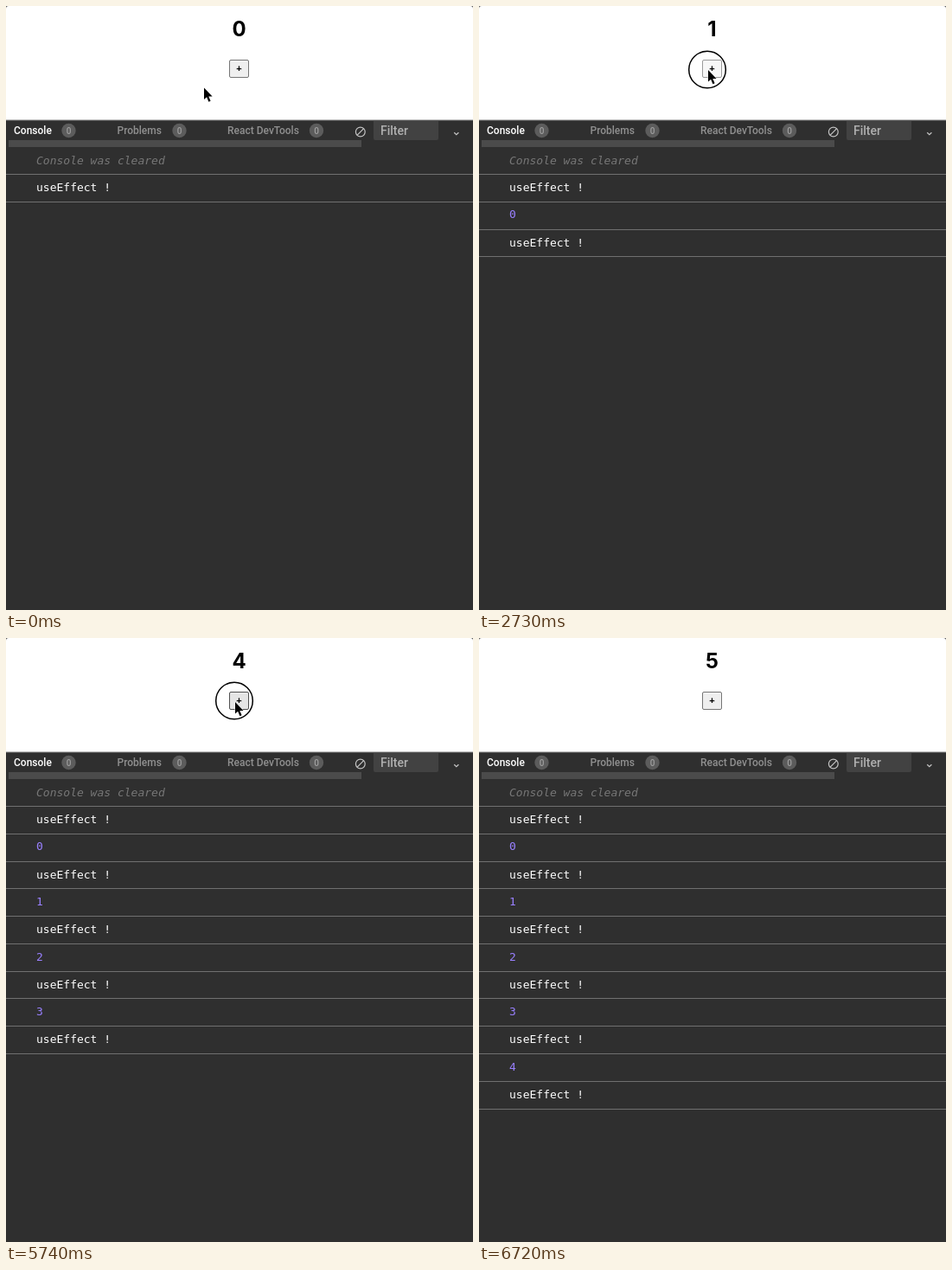
Write an HTML page that moves like this. It is 540x698 px and loops after 6.79 s.

```html
<!DOCTYPE html>
<html lang="en">
<head>
<meta charset="utf-8">
<title>useEffect counter</title>
<style>
  html, body { margin: 0; width: 100%; height: 100%; overflow: hidden; background: #fff; }
  svg { display: block; width: 100%; height: 100%; }
  text { white-space: pre; }
  .ui { font: 500 12px Roboto, sans-serif; }
  .mono { font: 13px "DejaVu Sans Mono", monospace; }
</style>
</head>
<body>
<svg viewBox="0 0 540 698">
  <rect width="540" height="698" fill="#fff"/>
  <path d="M0 0H3Q0 0 0 3ZM540 0H537Q540 0 540 3Z" fill="#555"/>
  <text id="count" x="269.5" y="34.5" text-anchor="middle" font-family="Inter, sans-serif" font-size="24" font-weight="700"></text>
  <rect id="button" x="258.5" y="62.5" width="22" height="20" rx="1.5"/>
  <text x="269.5" y="76.3" text-anchor="middle" font-family="Liberation Sans, sans-serif" font-size="11" font-weight="700">+</text>

  <rect y="132" width="540" height="566" fill="#2f2f2f"/>
  <rect y="131.5" width="540" height="1" fill="#777"/>
  <g id="tabs" class="ui"></g>
  <g fill="none" stroke="#c4c4c4" stroke-width="1.2">
    <circle cx="409.8" cy="145.5" r="5.4"/>
    <path d="M406 149.3L413.6 141.7M518.2 146.2L520.8 148.7L523.4 146.2"/>
  </g>
  <path d="M425 133H500V153Q500 155 498 155H427Q425 155 425 153Z" fill="#424242"/>
  <text class="ui" x="433" y="149" fill="#b0b0b0" style="font-size:14px">Filter</text>
  <rect x="3" y="155" width="408" height="8" fill="#4b4b4b"/>
  <text class="mono" x="35" y="183" fill="#777" font-style="italic" style="font-style:italic">Console was cleared</text>
  <rect y="194" width="540" height="1" fill="#707070"/>
  <g id="log" class="mono"></g>

  <circle id="ring" cx="264" r="21.3" fill="none" stroke="#000" stroke-width="1.5"/>
  <path id="cursor" d="M0 0V13.6L3.1 10.8L5.4 16.2L7.6 15.2L5.3 9.9H9.6Z" fill="#000" stroke="#fff" stroke-width="1" paint-order="stroke"/>
</svg>
<script>
const LOOP = 6790, STEP = 70;
const ROW_TOP = 194.5, ROW_H = 31.78;
const $ = id => document.getElementById(id);

// ring shown from on to off, button held from down to commit
const clicks = [
  { on: 1540, down: 1540, commit: 1680, off: 1680, y: 73.5 },
  { on: 2730, down: 2730, commit: 2800, off: 2870, y: 73.5 },
  { on: 3780, down: 3850, commit: 3920, off: 3920, y: 72.5 },
  { on: 4830, down: 4830, commit: 4970, off: 4970, y: 72.5 },
  { on: 5740, down: 5810, commit: 5880, off: 5880, y: 72.5 }
];

const buttonLook = {
  idle: ['#efefef', '#767676'],
  hover: ['#e5e5e5', '#505050'],
  down: ['#f7f7f7', '#9a9a9a']
};

function add(parent, tag, attrs, text = '') {
  const node = document.createElementNS('http://www.w3.org/2000/svg', tag);
  for (const key in attrs) node.setAttribute(key, attrs[key]);
  node.textContent = text;
  parent.append(node);
  return node;
}

function set(node, attrs) {
  for (const key in attrs) node.setAttribute(key, attrs[key]);
}

function addTab(label, x, badgeX, color) {
  add($('tabs'), 'text', { x, y: 148.3, fill: color }, label);
  add($('tabs'), 'circle', { cx: badgeX, cy: 144, r: 8.2, fill: '#5c5c5c' });
  add($('tabs'), 'text', {
    x: badgeX, y: 147.7, fill: '#a0a0a0', 'text-anchor': 'middle', style: 'font-size:10px'
  }, '0');
}

addTab('Console', 9, 72.5, '#fff');
addTab('Problems', 128.5, 200.5, '#909090');
addTab('React DevTools', 256, 359, '#909090');

const rows = Array.from({ length: 11 }, (_, i) => {
  const row = add($('log'), 'g', {});
  const top = ROW_TOP + ROW_H * i;
  const isNumber = i % 2 === 1;
  add(row, 'text', {
    x: 35, y: top + (isNumber ? 19.2 : 19.7), fill: isNumber ? '#9980ff' : '#fff'
  }, isNumber ? (i - 1) / 2 : 'useEffect !');
  add(row, 'rect', { y: Math.floor(top + ROW_H), width: 540, height: 1, fill: '#707070' });
  return row;
});

const mix = (a, b, p) => a + (b - a) * p;

function cursorAt(t) {
  if (t < 6020) {
    const p = Math.min(1, Math.max(0, (t - 210) / 420));
    const e = p * p * (3 - 2 * p);
    return [mix(229, 265, e), mix(94.5, 74, e)];
  }
  if (t < 6160) {
    const p = (t - 5950) / 140;
    return [mix(265, 225, p), mix(74, 486, p * p)];
  }
  if (t >= 6440 && t < 6720) {
    const p = (t - 6440) / 210;
    return [mix(162, 292, p), 688 - 41 * Math.sin(Math.PI * (0.1 + 0.8 * p))];
  }
  return null;
}

function draw(t) {
  const count = clicks.filter(c => t >= c.commit).length;
  $('count').textContent = count;
  rows.forEach((row, i) => set(row, { display: i <= count * 2 ? 'inline' : 'none' }));

  const shown = clicks.find(c => t >= c.on && t < c.off);
  set($('ring'), { display: shown ? 'inline' : 'none', cy: shown ? shown.y : 0 });

  const pos = cursorAt(t);
  set($('cursor'), { display: pos ? 'inline' : 'none' });
  if (pos) set($('cursor'), { transform: `translate(${pos[0]} ${pos[1]})` });

  const over = pos && pos[0] >= 258 && pos[0] <= 281 && pos[1] >= 62 && pos[1] <= 83;
  const held = clicks.some(c => t >= c.down && t < c.commit);
  const [fill, stroke] = buttonLook[held ? 'down' : over ? 'hover' : 'idle'];
  set($('button'), { fill, stroke });
}

const start = performance.now();
function tick() {
  const t = (performance.now() - start) % LOOP;
  draw(Math.floor(t / STEP) * STEP);
  requestAnimationFrame(tick);
}
tick();
</script>
</body>
</html>
```
